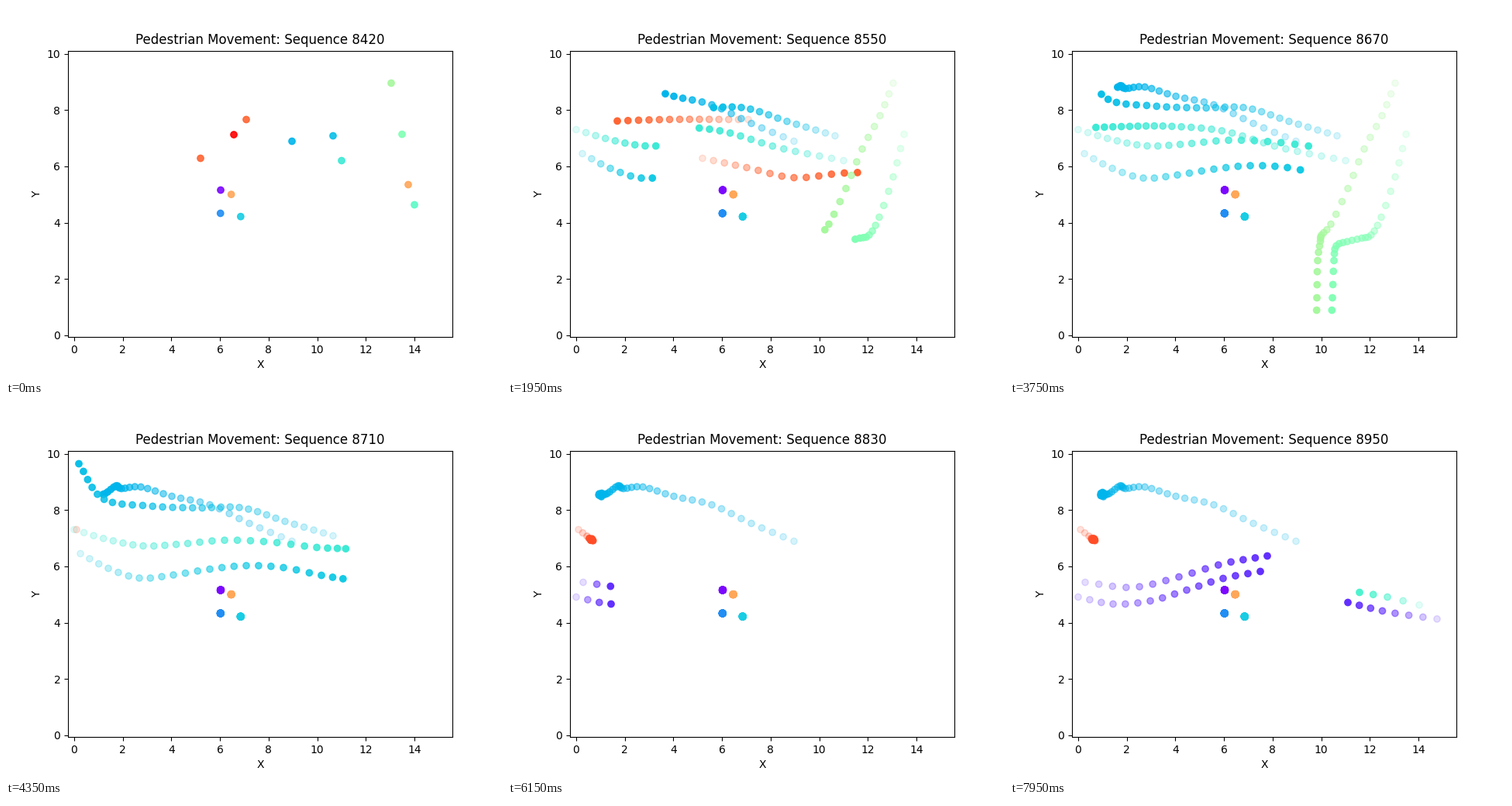
Animation of 640 by 480 pixels, one loop 8 s. Source, as a matplotlib script:

```python
import matplotlib.pyplot as plt
import numpy as np
from matplotlib.animation import FuncAnimation

plt.rcParams["font.family"] = "DejaVu Sans"

TICK_MS, TICKS, TICKS_PER_STEP = 50, 160, 3
LAST_STEP = (TICKS - 1) // TICKS_PER_STEP
OLDEST_ALPHA, OPENING_ALPHA = 0.16, 0.9
ORIGIN = np.array([88.0, 425.0])      # stage position of data point (0, 0)
SCALE = np.array([31.36, -36.34])     # stage pixels per data unit
DOT_SHIFT = np.array([0.0, 0.5])      # dot rows are given by pixel centre

rng = np.random.default_rng(4)


def to_data(points):
    return (np.asarray(points) - ORIGIN) / SCALE


def smooth_path(keys, count):
    """Spread `count` points along a smooth curve through evenly timed keys."""
    keys = np.array(keys, float)
    if len(keys) == 1:
        return np.repeat(keys, count, axis=0)
    slopes = np.gradient(keys, axis=0)
    t = np.linspace(0, len(keys) - 1, count)
    i = np.minimum(t.astype(int), len(keys) - 2)
    u = (t - i)[:, None]
    return ((1 + 2 * u) * (1 - u) ** 2 * keys[i] + u * (1 - u) ** 2 * slopes[i]
            + u * u * (3 - 2 * u) * keys[i + 1] + u * u * (u - 1) * slopes[i + 1])


class Walker:
    """Walks through the keys from step `start` to `end`; may then stay, swaying."""

    def __init__(self, hue, start, end, *keys, stays=False, sway=1.2):
        path = smooth_path(keys, end - start + 1)
        if stays:
            rest = rng.normal(keys[-1], sway, (LAST_STEP - end, 2))
            path = np.vstack([path, rest])
        self.color = plt.cm.rainbow(hue)
        self.start = start
        self.path = to_data(path + DOT_SHIFT)

    def present(self, step):
        return self.start <= step < self.start + len(self.path)

    def trail(self, step):
        points = self.path[:step - self.start + 1]
        colors = np.tile(self.color, (len(points), 1))
        colors[:, 3] = np.linspace(OLDEST_ALPHA, 1, len(points)) if step else OPENING_ALPHA
        return points, colors


def stander(hue, x, y):
    return Walker(hue, 0, 0, (x, y), stays=True, sway=0.2)


walkers = [
    stander(0.01, 277, 237),
    stander(0.77, 290.6, 242.6),
    stander(0.19, 276.7, 267),
    stander(0.30, 302.8, 271.2),
    # leaving early
    Walker(1.0, 0, 12, (294, 165.5), (226, 146), (161, 129), (90, 116)),
    Walker(0.87, 0, 17, (310, 146), (202, 146), (86, 150)),
    Walker(0.77, 0, 3, (519, 230), (565, 224)),
    Walker(0.43, 0, 2, (527, 256), (557, 250)),
    # crossing to the right edge
    Walker(0.87, 0, 20, (251, 196), (308, 208), (369, 221), (434, 215), (503, 215), (574, 222)),
    # drifting left along the top
    Walker(0.25, 0, 32, (369, 174), (314, 151), (263, 127), (214, 116), (174, 104),
           (149, 106), (142, 102.5), (128, 112.5), (119, 114), stays=True),
    Walker(0.27, 0, 29, (422, 167), (362, 149), (305, 131), (247, 131), (185, 128.5),
           (125, 119), (94, 74)),
    Walker(0.37, 0, 27, (433, 199), (350, 182.5), (276, 161), (206.5, 154.7), (148, 155),
           (89, 157)),
    # walking down
    Walker(0.575, 0, 27, (497, 99), (480, 141), (457, 184), (436, 235), (414, 281),
           (402, 295), (400.5, 303), (397, 328), (396, 376), (395, 424)),
    Walker(0.5, 0, 27, (511, 165), (497, 220), (479, 272), (466, 295), (454, 299),
           (435, 303.5), (421, 309), (418, 328), (416, 376), (414, 424)),
    # crossing from left to right
    Walker(0.37, 5, 40, (88, 159), (132, 172), (177, 180), (227, 177.5), (282, 172.7),
           (341, 175), (401, 182), (443, 184), (462, 188), (509, 203), (574, 210)),
    Walker(0.29, 6, 39, (96, 190), (132, 209), (172, 221.5), (216, 217.5), (263, 210),
           (310, 205.5), (358, 208), (407, 218), (446, 223.5), (465, 221), (509, 231),
           (565, 240)),
    # late arrivals
    Walker(0.9, 29, 32, (91, 159), (107.5, 171.7), stays=True),
    Walker(0.06, 39, 53, (97, 227), (158.5, 233.5), (218, 220), (277, 202.5), (332, 193)),
    Walker(0.06, 38, 53, (88, 246), (133, 255), (181, 251), (228, 237), (275, 222), (323, 213)),
    Walker(0.06, 46, 53, (551, 274.3), (488.5, 265.5), (436, 253)),
    Walker(0.4, 49, 53, (528, 256.3), (487, 246), (451, 240)),
]

fig, ax = plt.subplots(figsize=(6.4, 4.8), dpi=100)
corners = to_data([(80, 427.2), (576, 57.6)])
ax.set_xlim(corners[:, 0])
ax.set_ylim(corners[:, 1])
ax.set_xticks(range(0, 15, 2))
ax.set_yticks(range(0, 11, 2))
ax.set_xlabel("X")
ax.set_ylabel("Y")
title = ax.set_title("")
dots = ax.scatter([], [])


def update(tick):
    step = tick // TICKS_PER_STEP
    trails = [w.trail(step) for w in walkers if w.present(step)]
    points, colors = map(np.vstack, zip(*trails))
    dots.set_offsets(points)
    dots.set_facecolor(colors)
    dots.set_edgecolor(colors)
    title.set_text(f"Pedestrian Movement: Sequence {8420 + 10 * step}")
    return dots, title


animation = FuncAnimation(fig, update, frames=TICKS, interval=TICK_MS,
                          repeat=True, repeat_delay=0)
plt.show()
```
